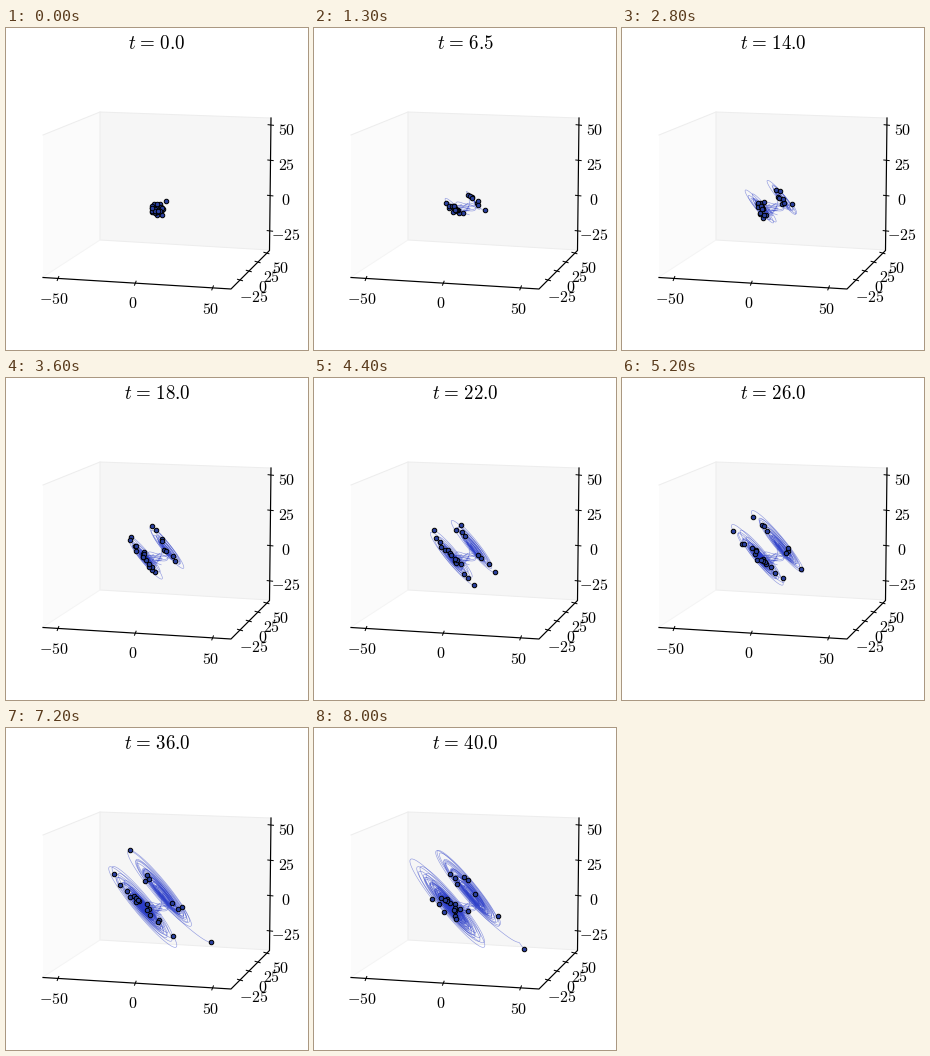
A matplotlib script for the animation above (8100 ms loop, 302 by 322 pixels).

```python
import numpy as np
import matplotlib.pyplot as plt
from matplotlib.animation import FuncAnimation
from matplotlib.collections import LineCollection

W, H, DPI = 302, 322, 100
PX = 72 / DPI
FRAMES, INTERVAL, DT, SUB = 81, 100, 0.5, 6
plt.rcParams["mathtext.fontset"] = "cm"

# Two tilted scrolls: unit vectors along and across them
ALONG, ACROSS = np.array([0.64, 0.77]), np.array([0.77, -0.64])
ASPECT, SPIN = 6.5, 0.95
TOP_TIME = 32  # when the outermost particle of a scroll is at its upper end
EXIT = np.array([210, 221])


def scroll_paths(start, drift, count, decay, t, rng):
    """Particles circling a drifting centre on slowly widening ellipses."""
    centre = np.array(start) + np.outer(t / 40, drift)
    reach = 7 + 1.35 * t
    paths = []
    for i in range(count):
        phase = np.pi * (1 + i) + (rng.normal(0, 0.5) if i else 0)
        angle = SPIN * (t - TOP_TIME) + phase
        radius = reach * decay ** i
        across = radius * np.sin(angle) / ASPECT + rng.normal(0, 1.2)
        paths.append(centre + np.outer(radius * np.cos(angle), ALONG)
                     + np.outer(across, ACROSS))
    return paths


def build_paths():
    rng = np.random.default_rng(4)
    t = np.arange((FRAMES - 1) * SUB + 1) * DT / SUB
    left = scroll_paths((141, 181), (-6, -5), 16, 0.87, t, rng)
    right = scroll_paths((164, 176), (-12, -18), 8, 0.85, t, rng)
    paths = np.array(left + right)
    # All begin in one small cloud and are drawn onto their scrolls
    cloud = rng.uniform((145, 175), (157, 188), (len(paths), 2))
    cloud[-1] = 160, 173
    hold = np.exp(-(t / 2.8) ** 1.5)[None, :, None]
    paths += hold * (cloud[:, None] - paths)
    # The outermost particle on the right finally escapes
    runaway = paths[len(left)]
    s = np.clip((t - 34) / 5, 0, 1)[:, None]
    runaway += (1 - (1 - s) ** 3) * (EXIT - runaway)
    return paths


fig = plt.figure(figsize=(W / DPI, H / DPI), dpi=DPI, facecolor="white")
ax = fig.add_axes([0, 0, 1, 1])
ax.set(xlim=(0, W), ylim=(H, 0))
ax.axis("off")


def pane(corners, color):
    ax.fill(*zip(*corners), color=color, lw=0, zorder=0)


def line(points, color="black", width=1.0):
    ax.plot(*zip(*points), color=color, lw=width * PX, zorder=1)


def tick_axis(values, tick, tick_step, mark, label, label_step):
    """Evenly spaced tick marks with their labels along one axis."""
    for i, value in enumerate(values):
        x, y = np.add(tick, np.multiply(i, tick_step))
        dx, dy = mark
        line([(x - dx, y - dy), (x + dx, y + dy)])
        ax.text(*np.add(label, np.multiply(i, label_step)), f"${value}$",
                fontsize=16 * PX, ha="center", va="center")


pane([(37, 107), (94, 84), (94, 212), (37, 249)], "#fbfbfb")
pane([(94, 84), (265, 90), (263, 222), (94, 212)], "#f6f6f6")
line([(37, 107), (94, 84), (265, 90)], "#ededed")
line([(94, 84), (94, 212), (263, 222)], "#ededed")
line([(94, 212), (37, 249)], "#f4f4f4")
line([(37, 249.5), (225, 261), (263.5, 222.5), (265, 90)], width=1.2)

tick_axis([-50, 0, 50], (52, 250.5), (77.3, 4.7), (-0.8, 2),
          (48.3, 271), (78.3, 5))
tick_axis([50, 25, 0, -25], (264.8, 97), (-0.3, 35.3), (2.7, 0.3),
          (280.5, 102), (-0.2, 35))
tick_axis([-25, 0, 25, 50], (234, 252), (8.8, -9), (2.5, 0.7),
          (248, 270), (9, -10))

PATHS = build_paths()
trails = LineCollection([], colors="#2a3cc8", linewidths=0.6 * PX, alpha=0.5,
                        zorder=2)
ax.add_collection(trails)
dots, = ax.plot([], [], "o", ms=4.5 * PX, mfc="#2a409f", mec="black",
                mew=1.0 * PX, zorder=3)
title = ax.text(151, 21, "", fontsize=19 * PX, ha="center", va="baseline")


def draw(frame):
    now = frame * SUB
    trails.set_segments(list(PATHS[:, :now + 1]))
    dots.set_data(PATHS[:, now, 0], PATHS[:, now, 1])
    title.set_text(rf"$t\hspace{{0.1}}=\hspace{{0.1}}{frame * DT:.1f}$")
    return trails, dots, title


anim = FuncAnimation(fig, draw, frames=FRAMES, interval=INTERVAL, repeat=True,
                     repeat_delay=0)
plt.show()
```
